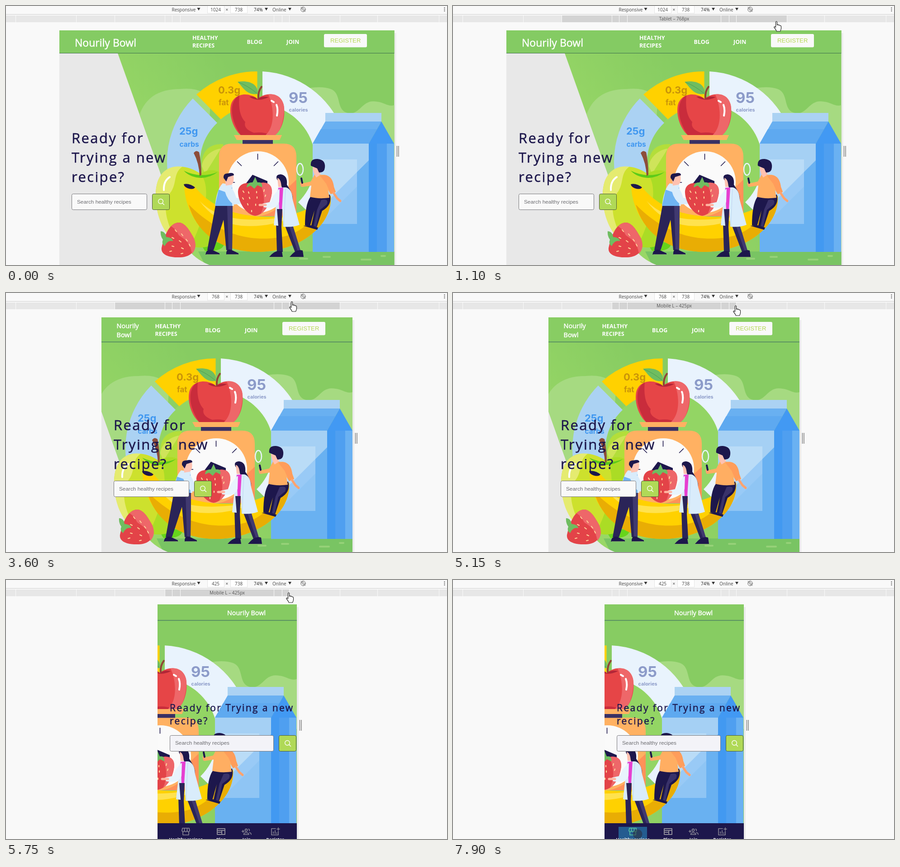
Recreate the animation shown at these times as an HTML page. Size 975 px wide and 574 px high, loop 8000 ms.

```html
<!DOCTYPE html>
<html lang="en">
<head>
<meta charset="utf-8">
<title>Responsive preview</title>
<style>
html, body { margin: 0; width: 100%; height: 100%; overflow: hidden; background: #f9f9f9 }
svg { display: block }
text { font-family: "Open Sans", "Noto Sans", sans-serif; white-space: pre }
.ui { font-size: 10px; fill: #444 }
.brand { fill: #fff; stroke: #fff; stroke-width: .5px }
.nav { fill: #fff; font-size: 12.5px; font-weight: 700 }
.head { fill: #1d174c; stroke: #1d174c; stroke-width: .5px; letter-spacing: 2.4px }
.arial { font-family: "Liberation Sans", Arial, sans-serif }
.hint { font-size: 11.8px; fill: #6c6c70 }
.reg { font-size: 13.2px; fill: #b5d955 }
.tab { font: 700 9.6px "Liberation Serif", serif; fill: #fff; text-anchor: middle }
.fact text { font-family: Inter, sans-serif; font-weight: 700 }
.line { fill: none; stroke-linecap: round; stroke-linejoin: round }
</style>
</head>
<body>
<svg width="975" height="574" viewBox="0 0 975 574">
<defs>
  <linearGradient id="field" gradientUnits="userSpaceOnUse" x1="260" y1="290" x2="480" y2="110">
    <stop stop-color="#98d766"/><stop offset="1" stop-color="#87cc62"/>
  </linearGradient>
  <clipPath id="fieldClip"><path d="M229 54H860V574H450Q415 560 400 535Z"/></clipPath>
  <g id="search">
    <rect width="38" height="35" rx="3" fill="#b0d957" stroke="#4c5a35"/>
    <g class="line" stroke="#fff" stroke-width="1.4"><circle cx="18.5" cy="16.5" r="5.3"/><path d="M22.5 20.5l3.5 3.5"/></g>
  </g>
  <g id="register">
    <rect width="95" height="29.5" rx="3" fill="#f9f9f9"/>
    <text class="arial reg" x="14" y="19">REGISTER</text>
  </g>
</defs>

<!-- toolbar -->
<path d="M0 18.5H975" stroke="#ccc"/>
<g fill="#fff" stroke="#e4e4e4"><rect x="445.5" y="-2" width="37" height="18"/><rect x="496.5" y="-2" width="37" height="18"/></g>
<g class="ui">
  <text x="366.5" y="11.5">Responsive</text><text id="width" x="463.5" y="11.5" text-anchor="middle"></text>
  <text x="485.5" y="12">×</text><text x="506" y="11.5">738</text>
  <text x="548" y="11.5" fill="#222">74%</text><text x="589" y="11.5">Online</text>
</g>
<path d="M422.5 4h7l-3.5 6zM572 4h7l-3.5 6zM624 4h7l-3.5 6z" fill="#333"/>
<g class="line" stroke="#666"><circle cx="657" cy="7.5" r="5.3"/><path d="M653.5 6l2.5-2.5 5 5-2.5 2.5zM652 2.5l10 10"/></g>
<path d="M969.5 3v2m0 1.5v2m0 1.500v2" stroke="#666" stroke-width="2"/>
<rect y="21" width="975" height="15" fill="#e7e7e7"/>
<rect id="range" y="21" height="15" fill="#d3d3d3"/>
<path id="ticks" stroke="#fafafa"/>
<text id="label" class="ui" x="489" y="32" text-anchor="middle" style="fill:#555"></text>

<!-- frame of the page -->
<rect id="shadow" y="60" width="4" height="514" fill="#ebebeb"/>
<path id="grip" d="M-.5 310v24M3 310v24" stroke="#808080" stroke-width="1.5"/>

<svg id="page" y="54" height="520">
  <rect x="118" y="54" width="745" height="520" fill="#e8e8e8"/>
  <g clip-path="url(#fieldClip)">
    <rect x="118" y="54" width="745" height="520" fill="url(#field)"/>
    <g fill="#a6da81">
      <path d="M290 262C300 205 335 184 385 184Q440 178 452 215L440 420H350Z"/>
      <path d="M640 190C675 178 700 178 718 184C742 193 730 228 752 236C784 246 785 205 820 212C838 214 846 225 860 219V330H640Z"/>
    </g>
    <path d="M425 544H860V574H440Z" fill="#79c463"/>
    <path d="M650 560h16m36-4h14m70 6h20m24-8h8" stroke="#96d178" stroke-width="4" stroke-linecap="round"/>
  </g>

  <!-- nutrition ring -->
  <circle cx="557" cy="345" r="127" fill="#93d564"/>
  <path d="M567 145A200 200 0 0 1 698 486L646 435A127 127 0 0 0 567 218Z" fill="#e9f3fd"/>
  <path d="M555.5 145A200 200 0 0 0 421 196L475 251A124 124 0 0 1 555.5 221Z" fill="#ffd100"/>
  <path d="M413 205A200 200 0 0 0 357 365L432 380A124 124 0 0 1 467 259Z" fill="#abd2f3"/>
  <g class="fact">
    <g fill="#c99309"><text x="469" y="194" font-size="22">0.3g</text><text x="470" y="220" font-size="17">fat</text></g>
    <g fill="#3f97f0"><text x="383" y="285" font-size="22">25g</text><text x="383.5" y="312" font-size="15.5">carbs</text></g>
    <g fill="#8c9bc9"><text x="625" y="215" font-size="33">95</text><text x="625.5" y="234" font-size="10.8">calories</text></g>
  </g>

  <!-- carton -->
  <path d="M706 237h124v19H706z" fill="#abd2f3"/>
  <path d="M706 256H830L802 305H678Z" fill="#69b0f1"/>
  <path d="M696 273H820L802 305H678Z" fill="#5ea9f0"/>
  <path d="M830 256L858 305H802Z" fill="#4299f3"/>
  <path d="M678 305H802V545H678Z" fill="#69b1f1"/>
  <path d="M678 305H802V342L678 466Z" fill="#a5d0f4"/>
  <path d="M690 340H776V483H678V446Z" fill="#d2e8fa" opacity=".45"/>
  <path d="M776 400V483H693Z" fill="#8fc5f4"/>
  <path d="M802 305H858V545H802Z" fill="#4299f1"/>
  <path d="M820 305H842V545H820Z" fill="#4f9ff0"/>
  <path d="M842 305H858V545H842Z" fill="#6ab1f2"/>

  <!-- green apple -->
  <path d="M433 355C432 322 448 305 480 306V400H430Z" fill="#b3de3a"/>
  <path d="M433 355C435 335 455 318 475 316L440 372Z" fill="#cfe45a"/>
  <path d="M420 510L482 528Q478 545 440 543Z" fill="#66d41b"/>
  <path d="M430 372C395 347 350 350 335 390C322 430 340 510 385 525C415 540 448 538 470 515C485 475 495 400 478 372C462 359 444 363 430 372Z" fill="#cde12d"/>
  <path d="M478 372C462 359 444 363 430 372C455 400 440 470 408 532C440 541 462 530 470 515C485 475 495 400 478 372Z" fill="#abdc25"/>
  <path d="M390 356C360 352 342 368 335 390C323 430 338 503 377 522C355 480 342 440 366 410C378 390 370 370 390 356Z" fill="#e5eb70"/>
  <path d="M393 365Q430 383 468 368Q452 380 432 381Q407 380 393 365Z" fill="#5ccb19"/>
  <path class="line" d="M349 408Q348 388 362 379" stroke="#fff" stroke-width="4"/>
  <path d="M415 326Q420 318 427 324Q432 348 432 374L428 377Q427 348 415 326Z" fill="#8d4d3a"/>

  <!-- scale -->
  <path d="M499 305H614Q642 305 642 334V466H471V334Q471 305 499 305Z" fill="#ffb162"/>
  <path d="M642 385V466H560Q615 455 626 400Z" fill="#ff9159"/>
  <path d="M504 286H610L605 297H510Z" fill="#ffb162"/>
  <path d="M523 297h67v8.5h-67z" fill="#393064"/>
  <circle cx="557" cy="390" r="68" fill="#fafafa"/>
  <path d="M556.5 328v12m-45 5l9 9m81-9l-9 9m-97 37h10" class="line" stroke="#1d174c" stroke-width="1.6"/>
  <path d="M530 394L545 374L578 388V397Z" fill="#1d174c"/>

  <!-- red apple -->
  <path d="M556 206C535 189 503 194 497 220C492 247 506 276 519 286H595C610 275 619 245 614 219C607 192 575 189 556 206Z" fill="#e64547"/>
  <path d="M516 198C496 208 491 245 519 286H585Q570 278 548 281Q524 272 529 257Q512 240 516 198Z" fill="#c92c3c"/>
  <path d="M580 196C601 193 615 207 615 229C614 256 606 279 595 286H574C596 266 592 222 580 196Z" fill="#ee6769"/>
  <path d="M538 201Q556 214 581 202Q567 198 556 206Q549 199 538 201Z" fill="#b32537"/>
  <path class="line" d="M587 210L592 213M598 219Q602 229 599 243" stroke="#fff" stroke-width="4"/>
  <path class="line" d="M558 204Q557 189 565 179" stroke="#914536" stroke-width="4"/>
  <path d="M512 168C534 164 559 171 556 195C533 198 526 183 512 168Z" fill="#6fbd60"/>
  <path class="line" d="M514 169Q535 177 554 193" stroke="#489b55"/>

  <!-- banana -->
  <path d="M394 399C397 480 465 545 556 545C645 545 723 489 718 420C690 440 655 461 601 467C520 471 456 450 417 400Z" fill="#ffd100"/>
  <path d="M404 440C423 510 485 545 556 545C645 545 723 489 718 420C694 445 670 508 595 514C520 523 456 493 404 440Z" fill="#e9ad04"/>
  <path d="M428 432C480 485 560 476 640 465Q585 492 520 487Q462 480 428 432Z" fill="#ffe24e"/>
  <path d="M393 395Q405 392 418 402Q414 408 402 404Q394 401 393 395Z" fill="#1d174c"/>

  <!-- corner strawberry -->
  <path d="M376 481C392 476 403 492 415 514C424 538 412 556 386 557C362 558 342 552 344 536C348 516 358 486 376 481Z" fill="#e34348"/>
  <path d="M376 481C392 476 403 492 415 514C422 529 419 541 411 549C408 522 390 514 382 508Q375 494 365 488Q370 483 376 481Z" fill="#ee6769"/>
  <path d="M342 499Q353 500 354 512Q368 513 369 521Q357 518 351 532Q343 527 347 518Q341 510 342 499Z" fill="#6fbd60"/>
  <path class="line" d="M374 496l3 4m11 5l3 4m-24 4l4 2m12 5l4 3m11-6l3 4m-34 11l4 1m17 3l4 2m13-10l2 4m-45 12l4-1m21 6l4-1" stroke="#ffd39a" stroke-width="2"/>

  <!-- man on the left -->
  <path d="M463 443H501L500 541H487L481 474L459 541H445Z" fill="#2a2458"/>
  <path d="M489 443H501L500 541H492Z" fill="#403970"/>
  <path d="M441 551Q443 537 457 541L472 548V551ZM487 551Q486 537 497 540L514 548V551Z" fill="#1d174c"/>
  <path class="line" d="M443 551H471M488 551H513" stroke="#87b76c" stroke-width="1.5"/>
  <path d="M479 393L500 396L504 443H462Q466 406 479 393Z" fill="#d9ecfb"/>
  <path d="M470 407L487 413L500 402V443H462Z" fill="#6fb4f3"/>
  <path d="M489 398Q502 400 509 425L536 430V437L503 440Q489 430 484 411Z" fill="#d9ecfb"/>
  <path d="M483 375H503Q505 390 499 396L486 398Z" fill="#ffc1b0"/>
  <path class="line" d="M528 433L540 435" stroke="#ffb4a0" stroke-width="5"/>
  <path d="M481 381Q480 370 491 371Q504 368 504 375L491 379L487 389Z" fill="#1d174c"/>

  <!-- shared strawberry -->
  <path d="M513 414C512 393 532 388 549 396C568 386 588 393 588 412C586 435 573 462 551 465C531 463 514 435 513 414Z" fill="#e34348"/>
  <path d="M562 393C578 388 589 397 588 412C586 432 576 453 563 461Q578 430 562 393Z" fill="#ee6769"/>
  <path d="M532 402Q533 390 545 391L551 379L556 391Q568 389 566 402L556 397L549 405L541 398Z" fill="#6fbd60"/>
  <path class="line" d="M524 410l2 3m10-1l1 3m17-4l0 3m17-7l-1 4m-47 14l2 3m13-4l1 3m16-4l0 3m19-7l-1 3m-39 16l1 3m17-2l0 3m-9 11l0 3" stroke="#ffd39a" stroke-width="2.2"/>

  <!-- woman -->
  <path d="M599 384Q595 374 607 373Q623 375 621 396Q638 421 633 433Q619 425 608 397Z" fill="#1d174c"/>
  <path d="M600 381Q608 383 609 401H602Z" fill="#ffc1b0"/>
  <path d="M596 448H611L609 490L612 545H599ZM614 480H632L651 542L639 545Z" fill="#2a2458"/>
  <path d="M624 482L632 480L651 542L645 544Z" fill="#403970"/>
  <path d="M582 556Q596 539 610 544L612 556ZM627 556Q642 537 656 542L658 556Z" fill="#1d174c"/>
  <path class="line" d="M583 557H612M628 557H658" stroke="#87b76c" stroke-width="1.5"/>
  <path d="M601 402L619 402Q633 406 634 430L649 485Q633 491 613 489L611 450H599L602 487L592 486L597 440Z" fill="#d9ecfb"/>
  <path d="M602 403L613 402L610 450H604Z" fill="#e63fd1"/>
  <path d="M605 405Q588 420 586 434L567 438L570 446Q600 451 604 434Z" fill="#e8f4fd"/>
  <path class="line" d="M561 441L574 441" stroke="#ffb4a0" stroke-width="5"/>
  <path class="line" d="M618 405L614 486" stroke="#bad9f1"/>

  <!-- man with the lens -->
  <path d="M673 423L716 418Q722 441 699 454L687 490L675 487L682 453L672 488L661 486Q661 440 673 423Z" fill="#1d174c"/>
  <path d="M697 430Q715 426 709 440L694 452L686 489L680 488L688 451Z" fill="#39326a"/>
  <path d="M657 487L674 486L690 491L688 496Z" fill="#1d174c"/>
  <path d="M682 374H704Q722 377 725 401L729 412L718 417L712 408L715 425Q690 428 672 423L675 398L654 401L656 393L674 389Z" fill="#ffae62"/>
  <path d="M694 376L706 375Q722 377 725 401L729 412L718 417L708 394Z" fill="#ff9d5b"/>
  <path class="line" d="M724 414L732 426L739 432M653 393L654 398" stroke="#ffa36f" stroke-width="5"/>
  <path d="M678 357H695V374L686 380Q679 371 678 357Z" fill="#ffc1b0"/>
  <path d="M674 354Q672 338 689 339Q707 341 705 358Q704 370 692 369L688 360Z" fill="#1d174c"/>
  <ellipse cx="650" cy="362" rx="7" ry="13" fill="none" stroke="#e9f4fd" stroke-width="2.5"/>
  <path class="line" d="M653 382L655 392" stroke="#1d174c" stroke-width="4"/>

  <!-- wide layout -->
  <g id="wide">
    <path d="M118 54H863V104H118Z" fill="#84cb63"/><path d="M118 104.5H863" stroke="#3d6e4d"/>
    <text class="brand" x="152" y="89.5" font-size="23">Nourily Bowl</text>
    <g class="nav"><text x="412" y="75">HEALTHY</text><text x="412" y="92">RECIPES</text><text x="532.5" y="84">BLOG</text><text x="620" y="84">JOIN</text></g>
    <use href="#register" x="703" y="62"/>
  </g>

  <!-- medium layout -->
  <g id="medium" transform="translate(92)">
    <path d="M211 54H780V108H211Z" fill="#88cd63"/><path d="M211 108.5H780" stroke="#4c7f62" stroke-width="1.5"/>
    <g class="brand" font-size="14.5"><text x="244.5" y="78">Nourily</text><text x="244.5" y="97.5">Bowl</text></g>
    <g class="nav"><text x="329.5" y="78">HEALTHY</text><text x="329.5" y="95">RECIPES</text><text x="440" y="87">BLOG</text><text x="528" y="87">JOIN</text></g>
    <use href="#register" x="611" y="64"/>
  </g>

  <!-- large hero, shared by wide and medium -->
  <g id="hero">
    <g class="head" font-size="31"><text x="145" y="304">Ready for</text><text x="145" y="347">Trying a new</text><text x="145" y="390">recipe?</text></g>
    <rect x="145.5" y="416.5" width="166" height="35" rx="3" fill="#f9f9f9" stroke="#77777b"/>
    <text class="arial hint" x="157" y="437.5">Search healthy recipes</text>
    <use href="#search" x="323.5" y="416.5"/>
  </g>

  <!-- small layout -->
  <g id="small" transform="translate(216)">
    <path d="M335 54H643V89H335Z" fill="#86cb62"/><path d="M335 89.5H643" stroke="#4c7f62" stroke-width="1.3"/>
    <text class="brand" x="489" y="78" font-size="14.4">Nourily Bowl</text>
    <g class="head" font-size="21"><text x="362" y="291">Ready for Trying a new</text><text x="362" y="320">recipe?</text></g>
    <rect x="362.5" y="344.5" width="229" height="35" rx="3" fill="#f3f3f8" stroke="#77777b"/>
    <text class="arial hint" x="374" y="365">Search healthy recipes</text>
    <use href="#search" x="603.5" y="344.5"/>
    <path d="M335 539H643V574H335Z" fill="#1d174c"/>
    <rect id="tap" x="366" y="547" width="63" height="27" fill="#245c90"/>
    <g class="line" stroke="#8b8997" stroke-width="1.6">
      <path id="shop" d="M390 550H405L406 556Q403 560 400.5 556Q397.5 560 394.5 556Q391.5 560 389 556ZM394.5 550V556M400.5 550V556M391 559V565H404V559"/>
      <path d="M467 551H484V564H467ZM467 555H484M477 555V564M467 559H477" stroke-width="2"/>
      <circle cx="531" cy="554.5" r="2.6"/><path d="M525.5 564Q526 560 531 560Q536 560 537 564ZM521.5 557H526.5M524 554.5V559.5M536 552Q539 552 538 556M538 560Q542 560 542 564"/>
      <path d="M596 551H587V565H602V557M591 558V562M595 555V562M598.5 560V562M599 552H605M602 549V555"/>
    </g>
    <g class="tab"><text x="397.5" y="577.5">Healthy recipes</text><text x="475" y="577.5">Blog</text><text x="532" y="577.5">Join</text><text x="595" y="577.5">Register</text></g>
  </g>
</svg>

<!-- pointers -->
<path id="arrow" d="M.5 .5V16L4 12.5L6.5 18.5L9 17.5L6.5 11.5H11.5Z" fill="#fff" stroke="#111"/>
<path id="hand" d="M4.5 14V2.5Q6 -.5 7.5 2.5V9Q9.5 7 10.5 9.5Q12.5 8 13.5 10.5Q16.5 9.5 16.5 13V17Q16 20 14.5 23H6.5Q5 19 1 14.5Q.5 11.5 4.5 14Z" fill="#fff" stroke="#222" stroke-width="1.2"/>
<circle id="touch" r="10.5" fill="#2b2b38" opacity=".55"/>
</svg>
<script>
const $ = id => document.getElementById(id);
const LOOP = 8000;

// [start, layout, left, right, origin, width label]
const views = [
  [0, "wide", 118, 858.5, 118, 1024],
  [2080, "medium", 211, 766, 303, 768],
  [5600, "medium", 335, 643, 303, 425],
  [5750, "small", 335, 643, 551, 425],
];
// [start, range left, range right]
const ranges = [[0, 0, 0], [1100, 240, 738], [5010, 352, 626], [6030, 0, 0]];
const labels = [
  [0, ""], [1100, "Tablet – 768px"], [2360, ""], [3870, "Tablet – 768px"],
  [5010, "Mobile L – 425px"], [6030, ""],
];
// [start, pointer, x, y]
const moves = [
  [0], [130, "arrow", 682, 38], [270, "arrow", 691, 47], [410, "arrow", 746, 43],
  [540, "touch", 710, 87], [680, "touch", 673, 70], [810, "arrow", 695, 48],
  [950, "arrow", 711, 34], [1100, "hand", 709, 33], [2360],
  [3320, "touch", 623, 77.5], [3460, "hand", 624, 20], [3600, "hand", 626, 18],
  [3740, "hand", 640, 22], [3870, "hand", 652, 26], [4020, "hand", 654, 27],
  [4860, "hand", 621, 27], [5010, "hand", 622, 27], [5150, "hand", 619, 27], [6030],
  [6910, "touch", 487, 502], [7050], [7620, "touch", 408, 563],
];

const at = (list, t) => list.findLast(row => row[0] <= t).slice(1);
const show = (id, on) => { $(id).style.display = on ? "" : "none"; };
const set = (id, attrs) => {
  for (const key in attrs) $(id).setAttribute(key, attrs[key]);
};

const ticks = [21, 155, 240, 351, 367, 385, 592, 610, 626, 738, 821, 957];
set("ticks", { d: ticks.map(x => `M${x}.5 21v15`).join("") });

function draw(now) {
  const t = now % LOOP;

  const [layout, left, right, origin, size] = at(views, t);
  const width = right - left;
  set("page", { x: left, width, viewBox: `${origin} 54 ${width} 520` });
  set("shadow", { x: right });
  set("grip", { transform: `translate(${Math.floor(right) + 7})` });
  for (const name of ["wide", "medium", "small"]) show(name, name === layout);
  show("hero", layout !== "small");
  set("hero", { transform: `translate(${layout === "wide" ? 0 : 185})` });
  $("width").textContent = size;

  const [from, to] = at(ranges, t);
  set("range", { x: from, width: to - from });
  $("label").textContent = at(labels, t)[0];

  const [pointer, x, y] = at(moves, t);
  for (const name of ["arrow", "hand", "touch"]) show(name, name === pointer);
  if (pointer) set(pointer, { transform: `translate(${x} ${y})` });

  const tapped = t >= 7900;
  show("tap", tapped);
  set("shop", { stroke: tapped ? "#58c7a0" : "#8b8997" });
  requestAnimationFrame(draw);
}
requestAnimationFrame(draw);
</script>
</body>
</html>
```
